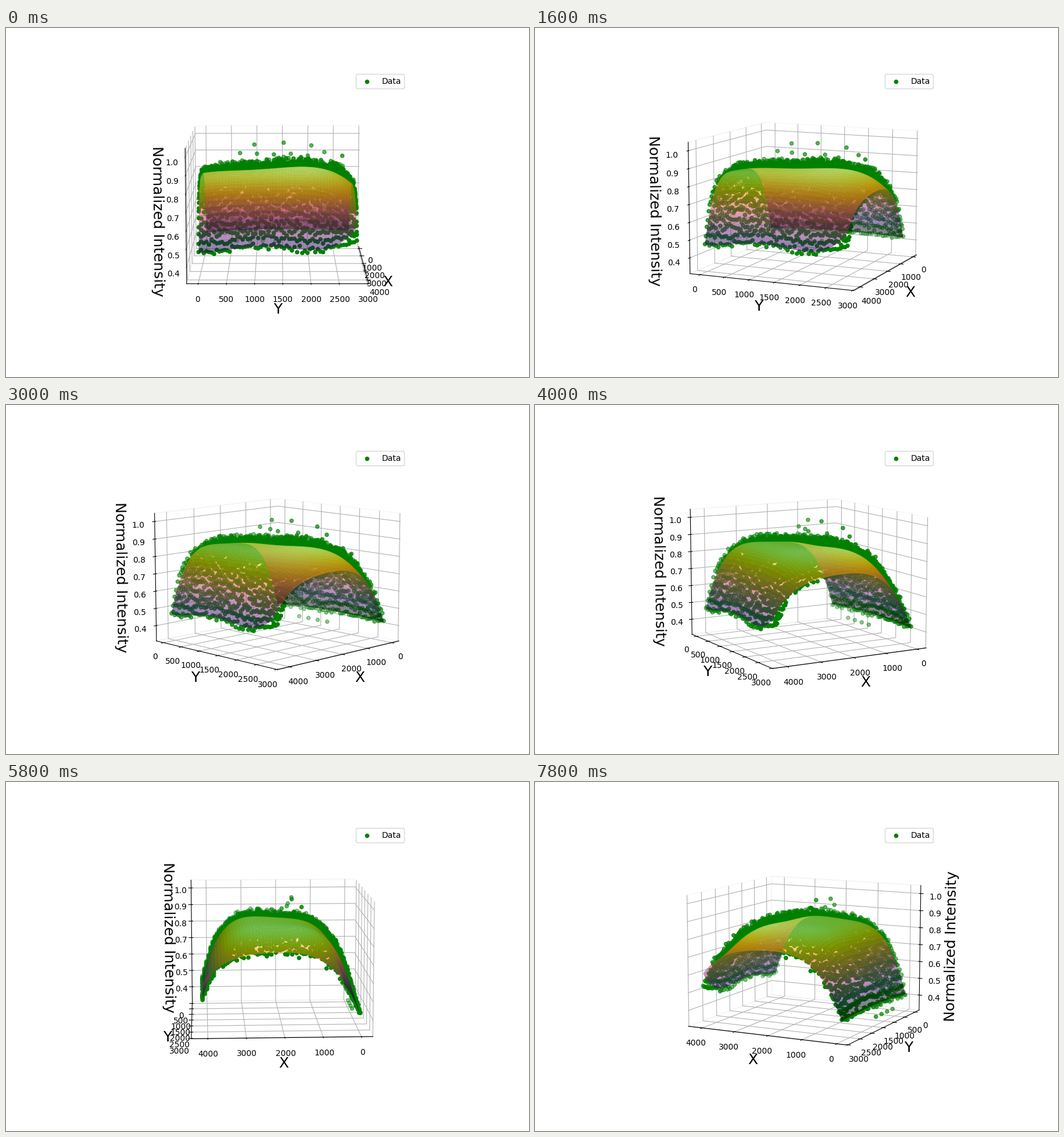
Write a matplotlib script that moves like this. It is 900 px wide and 600 px high and loops after 8 s.

```python
import numpy as np
import matplotlib.pyplot as plt
from matplotlib.animation import FuncAnimation

FRAMES, STEP_DEG, ELEV = 40, 3, 10
WIDTH, HEIGHT = 4128, 2816


def fit(s, t):
    """Arched polynomial surface on the square [-1, 1] x [-1, 1]."""
    ridge = .854 + .03 * t - .005 * t**2 - .062 * t**3 - .052 * t**4
    low = .43 + .005 * t - .015 * t**2
    high = .498 - .036 * t - .071 * t**2 + .105 * t**3 + .109 * t**4
    round_off = .2 * t**3 * (1 + t)
    drop = round_off * s**2 + (1 - round_off) * s**4
    arch = ridge + ((low + high) / 2 - ridge) * drop
    return arch + (high - low) / 2 * s**3 + .015 * (1 - t) * (s - s**3)


def to_xy(s, t):
    return (s + 1) / 2 * WIDTH, (t + 1) / 2 * HEIGHT


def mesh(nx, ny):
    return np.meshgrid(np.linspace(-1, 1, nx), np.linspace(-1, 1, ny),
                       indexing="ij")


def samples():
    """Noisy grid of measurements plus a few stray ones."""
    rng = np.random.default_rng(4)
    s, t = (a.ravel() for a in mesh(70, 62))
    edge = np.maximum(np.abs(s), t)
    shoulder = np.exp(-((edge - .82) / .12) ** 2)
    corner = np.clip(s - .8, 0, 1) * np.clip(t - .7, 0, 1) / .06
    middle = (1 - s**4) * (1 - .6 * t**4)
    noise = np.clip(rng.normal(0, 1, s.size), -2.2, 2.2)
    z = fit(s, t) + .012 * middle + .018 * shoulder - .07 * corner
    z += noise * (.009 + .014 * middle)

    # Bright specks over the ridge and a few dim ones below the far edge
    top = [(-.18, .08, 1.0), (-.20, -.31, .988), (-.285, .45, .978)]
    top += [(rng.uniform(-.4, .1), u, rng.uniform(.925, .955))
            for u in np.linspace(-.5, .85, 7)]
    dim = [(-1, u, .358) for u in np.linspace(-.57, -.03, 4)]
    stray = np.array(top + dim).T
    s, t, z = (np.append(a, b) for a, b in zip((s, t, z), stray))
    return (*to_xy(s, t), np.clip(z, .357, 1))


fig = plt.figure(figsize=(9, 6), dpi=100)
ax = fig.add_subplot(111, projection="3d", computed_zorder=False)

ax.scatter(*samples(), c="green", label="Data", zorder=1)
s, t = mesh(50, 50)
ax.plot_surface(*to_xy(s, t), fit(s, t), cmap="inferno", alpha=.5, zorder=2)

ax.set_xlim(-301, 4429)
ax.set_ylim(-205, 3021)
ax.set_zlim(.310, 1.047)
ax.set_xlabel("X", fontsize=18)
ax.set_ylabel("Y", fontsize=18)
ax.set_zlabel("Normalized Intensity", fontsize=18)
for axis in (ax.xaxis, ax.yaxis, ax.zaxis):
    axis.pane.fill = False
ax.legend()


def update(i):
    # The tiny offset keeps the x axis on the right at the head-on view
    ax.view_init(elev=ELEV, azim=STEP_DEG * i + .01)
    return []


anim = FuncAnimation(fig, update, frames=FRAMES, interval=200,
                     init_func=lambda: update(0), repeat=True)
plt.show()
```
